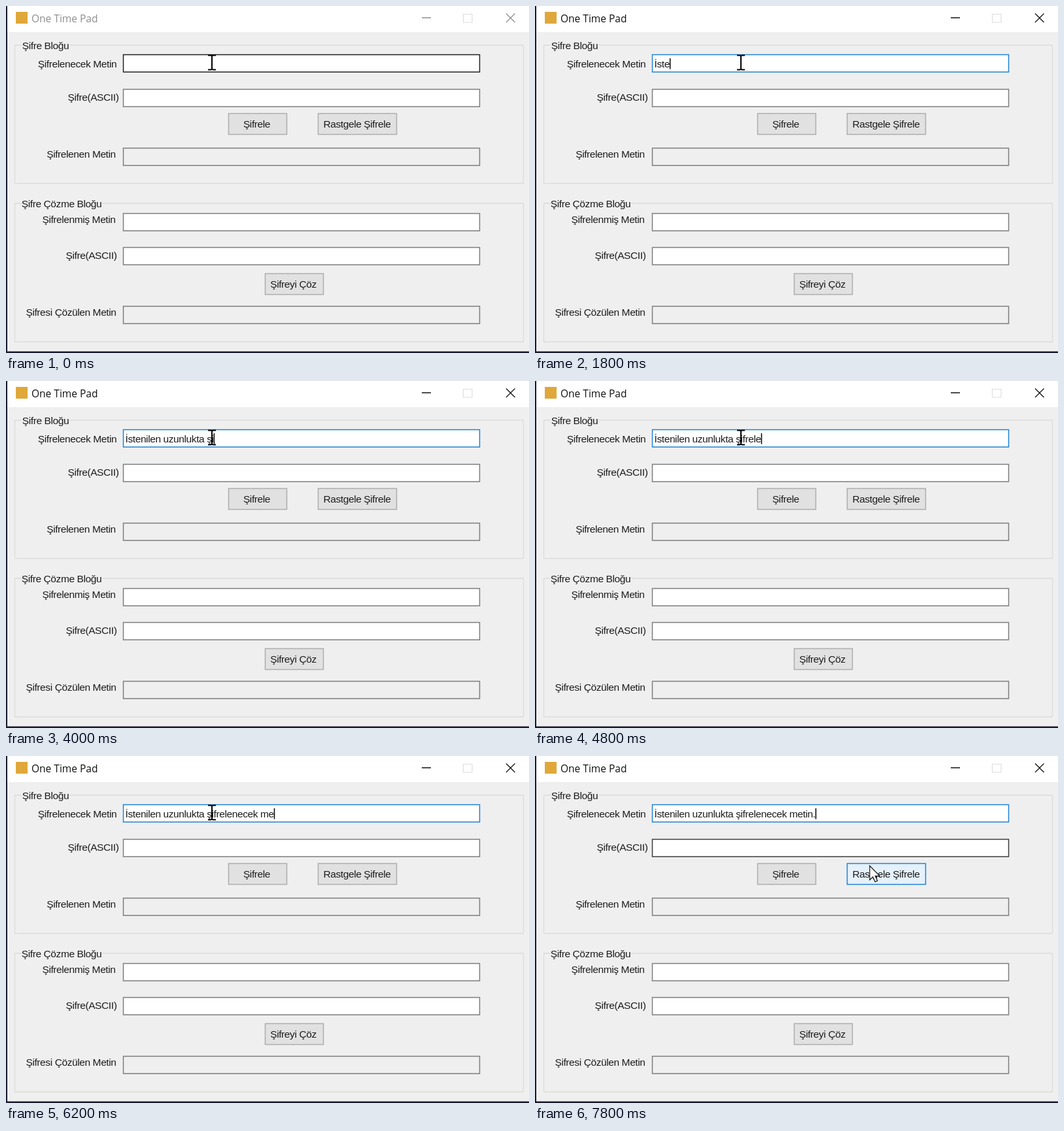
An HTML page that plays this animation: 800 by 531 pixels, repeating every 8000 ms.

```html
<!DOCTYPE html>
<html lang="tr">
<head>
<meta charset="utf-8">
<title>One Time Pad</title>
<style>
  html, body { margin: 0; width: 100%; height: 100%; overflow: hidden; background: #f0eff0; }
  svg { display: block; width: 100vw; height: 100vh; }
  text { font: 15.5px "Liberation Sans", Arial, sans-serif; letter-spacing: -.4px; fill: #1c1c1c; white-space: pre; }
  .title { font: 15.5px "Open Sans", "Noto Sans", sans-serif; letter-spacing: 0; }
  .mid { text-anchor: middle; }
</style>
</head>
<body>
<svg id="stage" viewBox="0 0 800 531"></svg>
<script>
const stage = document.getElementById('stage');

function add(tag, attrs, content) {
  const el = document.createElementNS('http://www.w3.org/2000/svg', tag);
  set(el, attrs);
  if (content) el.textContent = content;
  return stage.appendChild(el);
}
function set(el, attrs) {
  for (const k in attrs) el.setAttribute(k, attrs[k]);
}
const rect = (x, y, width, height, fill, stroke = 'none', sw = 1.5) =>
  add('rect', { x, y, width, height, fill, stroke, 'stroke-width': sw });
const path = (d, stroke, sw, fill = 'none') =>
  add('path', { d, stroke, 'stroke-width': sw, fill });
const label = (s, x, y) => add('text', { x, y, class: 'mid' }, s);
const show = (el, on) => set(el, { visibility: on ? 'visible' : 'hidden' });

function group(y, h, name, right) {
  path(`M24 ${y}H13.5V${y + h}H791.5V${y}H${right + 2}`, '#dcdcdd', 1.3);
  label(name, (26 + right) / 2, y + 6);
}
const field = (y, locked) =>
  rect(179.5, y + .5, 545, 26.5, locked ? '#f0eff0' : '#fff', '#7d7d7d');
function button(x, y, w, s) {
  const box = rect(x + .5, y + .5, w, 32, '#e1e1e1', '#adadad');
  label(s, x + w / 2 - (w === 89 ? 1 : 0), y + 22);
  return box;
}

// Window frame
rect(0, 0, 800, 531, '#f0eff0');
rect(0, 0, 800, 40, '#fff');
rect(0, 0, 2, 531, '#1b1c2e');
rect(0, 528.5, 800, 2.5, '#1b1c2e');
rect(15, 9, 18, 18, '#e0a83a');
const title = add('text', { x: 39, y: 25, class: 'title' }, 'One Time Pad');
const controls = path('M636 18H650M765 11.5L778.5 25M778.5 11.5L765 25', '#111', 1.3);
path('M699.5 12.5H713V25H699.5Z', '#dedede', 1.2);

// Encryption block
group(60, 211.5, 'Şifre Bloğu', 95);
label('Şifrelenecek Metin', 109, 94);
label('Şifre(ASCII)', 133.5, 145);
label('Şifrelenen Metin', 115, 232);
const plain = field(74);
const key = field(127);
field(217, true);
button(340, 164, 89, 'Şifrele');
const randomBtn = button(477, 164, 120, 'Rastgele Şifrele');

// Decryption block
group(302, 212, 'Şifre Çözme Bloğu', 144);
label('Şifrelenmiş Metin', 111.5, 332);
label('Şifre(ASCII)', 130.5, 387);
label('Şifresi Çözülen Metin', 99.5, 474);
field(317);
field(369);
field(459, true);
button(396, 409, 89, 'Şifreyi Çöz');

// Moving parts
const message = 'İstenilen uzunlukta şifrelenecek metin.';
const typed = add('text', { x: 182.5, y: 94 });
const caret = rect(0, 80, 1.5, 16.5, '#000');
const beam = path('M-6 -11H-1.5L0 -10L1.5 -11H6M-6 11H-1.5L0 10L1.5 11H6M0 -11V11', '#000', 2);
const arrow = path('M0 0V21.5L4.8 17L8.2 24.5L11.8 22.9L8.5 15.6H15.3Z', '#111', 1.2, '#fff');

const STEP = 200, LOOP = 8000;
// Letters typed per step, from 800 ms on
const counts = [1, 2, 3, 3, 4, 4, 6, 9, 11, 14, 14, 15, 16, 18, 19, 21, 22, 23,
  24, 26, 27, 28, 30, 31, 32, 33, 34, 35, 37, 38, 39];
// Pointer: start time, x, y, inside a text field
const moves = [[0, 315, 86.5, 1], [7200, 309.5, 124, 0], [7400, 352, 140, 1],
  [7600, 440, 145, 1], [7800, 512, 168, 0]];

function draw(t) {
  const active = t >= 200;
  set(title, { style: `fill:${active ? '#111' : '#8e8e8e'}` });
  set(controls, { stroke: active ? '#111' : '#8e8e8e' });
  set(plain, { stroke: active ? '#1f82d2' : '#222' });

  const i = Math.floor(t / STEP) - 4;
  const n = i < 0 ? 0 : counts[Math.min(i, counts.length - 1)];
  typed.textContent = message.slice(0, n);
  set(caret, { x: n ? 182.5 + typed.getComputedTextLength() : 183.5 });
  show(caret, active && (t < 6600 || t >= 7400));

  const [, x, y, inField] = moves.filter(m => m[0] <= t).pop();
  const pos = { transform: `translate(${x} ${y})` };
  set(beam, pos);
  set(arrow, pos);
  show(beam, inField);
  show(arrow, !inField);

  set(key, { stroke: t >= 7400 ? '#3c3c3c' : '#7d7d7d' });
  const hover = t >= 7800;
  set(randomBtn, { fill: hover ? '#e5f1fb' : '#e1e1e1', stroke: hover ? '#1f82d2' : '#adadad' });
}

const start = performance.now();
function tick() {
  draw((performance.now() - start) % LOOP);
  requestAnimationFrame(tick);
}
tick();
</script>
</body>
</html>
```
